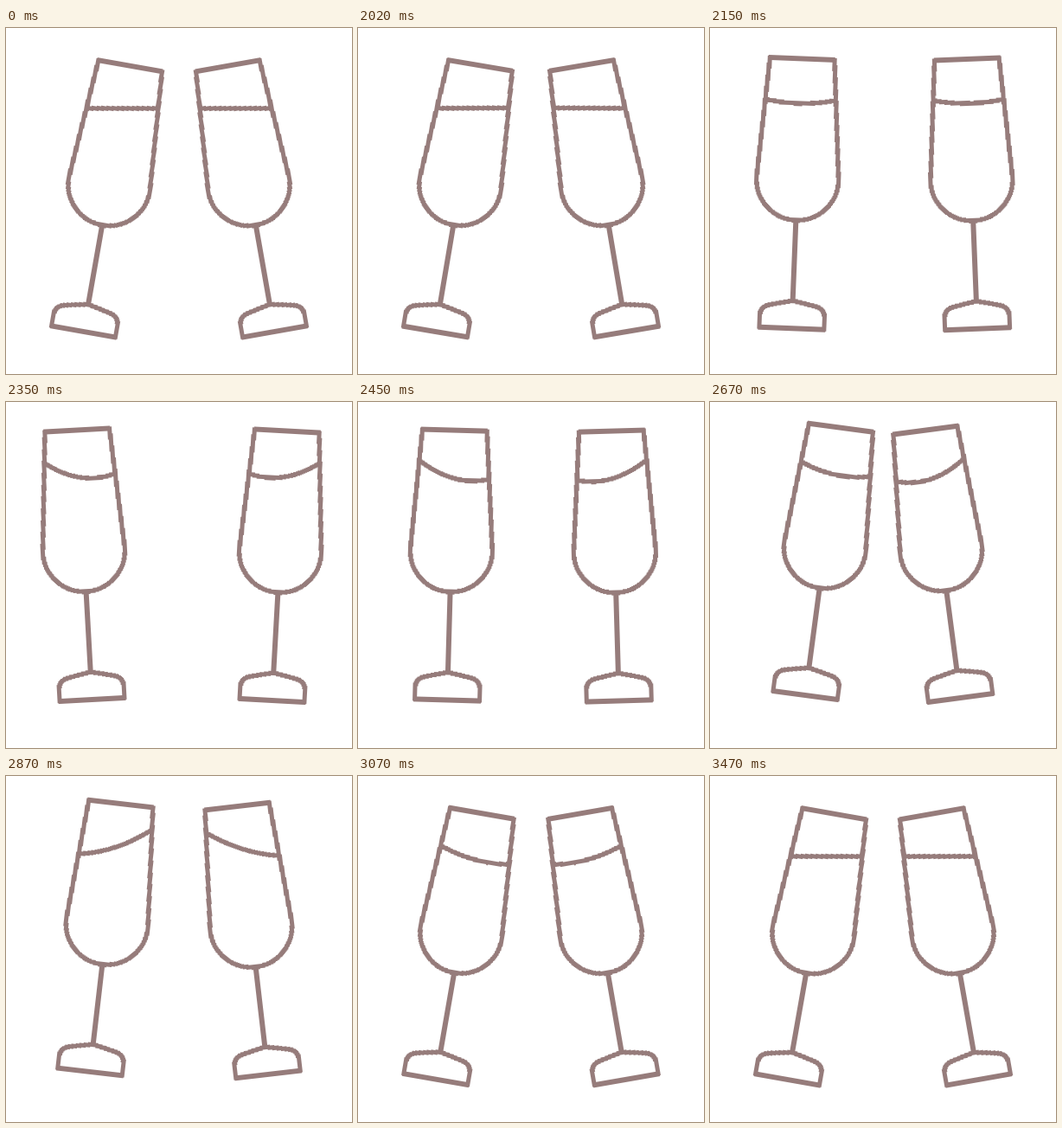
Recreate the animation shown at these times as an HTML page without scripts. Size 400 px wide and 400 px high, loop 3520 ms.

```html
<!DOCTYPE html>
<html lang="en">
<head>
<meta charset="utf-8">
<title>Clinking glasses</title>
<style>
  html, body { margin: 0; width: 100%; height: 100%; overflow: hidden; background: #fff; }
  svg { display: block; width: 100%; height: 100%; }

  .art { fill: none; stroke: #967c7b; stroke-width: 5.5; stroke-linecap: round; stroke-linejoin: round; shape-rendering: crispEdges; }
  .glass, .wine { animation: 3520ms linear infinite; }
  .wine { stroke-linecap: butt; }
  .left .glass { animation-name: swing-left; }
  .right .glass { animation-name: swing-right; }
  .left .wine { animation-name: slosh-left; }
  .right .wine { animation-name: slosh-right; }

  /* swing out, clink at 74.15%, bounce apart, settle */
  @keyframes swing-left {
    0%, 57.36% { transform: translate(90px, 351px) rotate(10deg); }
    57.39% { transform: translate(90px, 351px) rotate(9.6deg); animation-timing-function: cubic-bezier(.4, .1, .6, 1); }
    64.77% { transform: translate(99px, 344px) rotate(-3.9deg); animation-timing-function: cubic-bezier(.5, 0, 1, .7); }
    66.76% { transform: translate(100px, 344px) rotate(-3.2deg); animation-timing-function: cubic-bezier(.4, .15, .7, .9); }
    72.44% { transform: translate(107.5px, 345px) rotate(6.9deg); }
    74.15% { transform: translate(116.5px, 337px) rotate(8deg); }
    75.85% { transform: translate(110.7px, 339px) rotate(7.6deg); animation-timing-function: cubic-bezier(.3, .3, .6, 1); }
    81.53% { transform: translate(97.5px, 342px) rotate(6.6deg); animation-timing-function: cubic-bezier(.4, 0, .5, 1); }
    88.35%, 100% { transform: translate(90px, 351px) rotate(10deg); }
  }
  @keyframes swing-right {
    0%, 57.36% { transform: translate(90px, 351px) rotate(10deg); }
    57.39% { transform: translate(90px, 351px) rotate(9.6deg); animation-timing-function: cubic-bezier(.4, .1, .6, 1); }
    64.77% { transform: translate(92.5px, 345px) rotate(-3.9deg); animation-timing-function: cubic-bezier(.5, 0, 1, .7); }
    66.76% { transform: translate(93px, 345px) rotate(-3.2deg); animation-timing-function: cubic-bezier(.4, .15, .7, .9); }
    72.44% { transform: translate(105px, 346px) rotate(7deg); }
    74.15% { transform: translate(116px, 340px) rotate(8deg); }
    75.85% { transform: translate(111px, 342px) rotate(7.5deg); animation-timing-function: cubic-bezier(.3, .3, .6, 1); }
    81.53% { transform: translate(97.5px, 345px) rotate(6.6deg); animation-timing-function: cubic-bezier(.4, 0, .5, 1); }
    88.35%, 100% { transform: translate(90px, 351px) rotate(10deg); }
  }

  @keyframes slosh-left {
    0%, 57.39% { d: path("M-40-255Q0-262 40-269"); }
    66.76% { d: path("M-40-276Q0-247 40-259"); }
    72.44% { d: path("M-40-276Q0-247 40-253"); }
    75.85% { d: path("M-40-267Q0-251 40-260"); }
    81.53% { d: path("M-40-249Q2-256 40-287"); animation-timing-function: ease-in-out; }
    87.2% { d: path("M-40-267Q0-253 40-259"); animation-timing-function: ease-in-out; }
    92.6% { d: path("M-40-251Q0-258 40-275"); animation-timing-function: ease-in-out; }
    98.58%, 100% { d: path("M-40-255Q0-262 40-269"); }
  }
  @keyframes slosh-right {
    0%, 57.39% { d: path("M-40-255Q0-262 40-269"); }
    66.76% { d: path("M-40-277Q0-249 40-260"); }
    72.44% { d: path("M-40-278Q0-246 40-252"); }
    75.85% { d: path("M-40-274Q0-245 40-257"); }
    81.53% { d: path("M-40-250Q0-257 40-286"); animation-timing-function: ease-in-out; }
    87.2% { d: path("M-40-267Q0-253 40-259"); animation-timing-function: ease-in-out; }
    92.6% { d: path("M-40-251Q0-258 40-275"); animation-timing-function: ease-in-out; }
    98.58%, 100% { d: path("M-40-255Q0-262 40-269"); }
  }
</style>
</head>
<body>
<svg viewBox="0 0 400 400">
  <defs>
    <!-- origin: middle of the foot's lower edge -->
    <g id="outline">
      <path d="M-37.3-312H37.3L47.5-172.5A47.5 47.5 0 0 1-47.5-172.5Z"/>
      <path d="M0-125V-32"/>
      <path d="M-37.5 0V-13Q-37.5-24-26-26.5L0-32L26-26.5Q37.5-24 37.5-13V0Z"/>
    </g>
  </defs>
  <g class="art">
    <g class="left" transform="translate(-.5 0)">
      <g class="glass">
        <use href="#outline"/>
        <path class="wine" d="M-40-255Q0-262 40-269"/>
      </g>
    </g>
    <g class="right" transform="matrix(-1 0 0 1 400.5 0)">
      <g class="glass">
        <use href="#outline"/>
        <path class="wine" d="M-40-255Q0-262 40-269"/>
      </g>
    </g>
  </g>
</svg>
</body>
</html>
```
